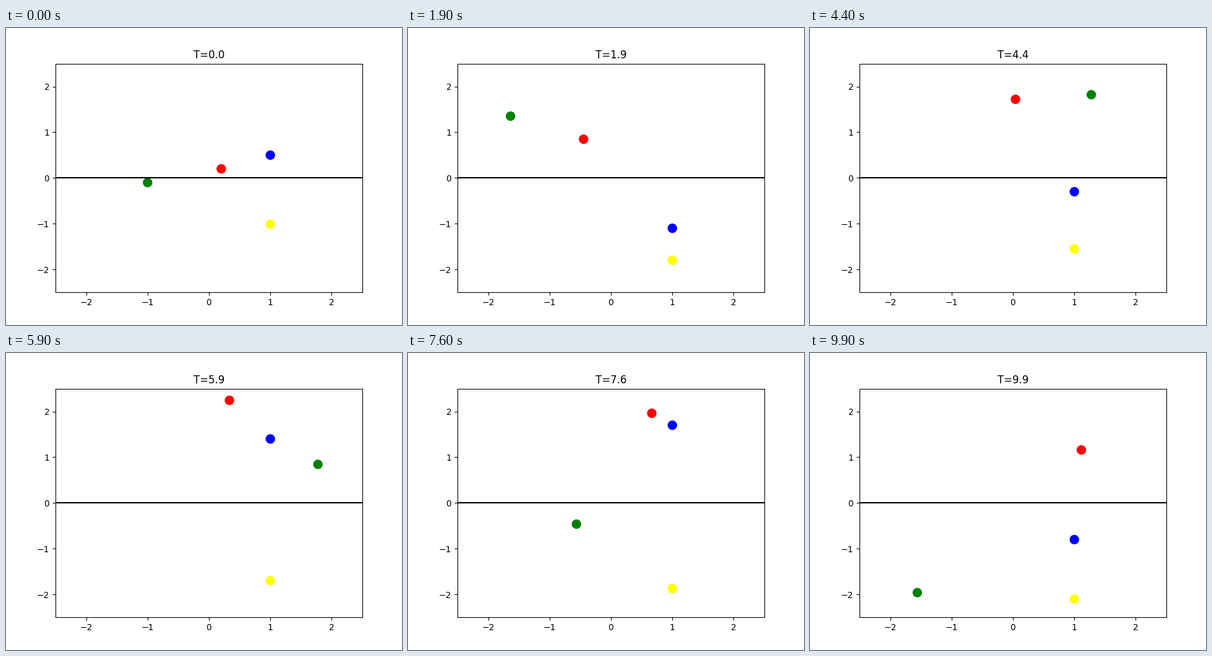
Recreate the animation shown at these times as a matplotlib script. Size 640x480 px, loop 10000 ms.

```python
import itertools

import matplotlib.pyplot as plt
import numpy as np
from matplotlib.animation import FuncAnimation

STEP = 0.1      # seconds per frame
FRAMES = 100
RADIUS = 0.1
LIMIT = 2.5 - RADIUS
LEAD = 0.997    # seconds a leading ball runs ahead until its first hit
EPS = 1e-6


class Ball:
    def __init__(self, color, pos, vel, leads=False):
        self.color = color
        self.pos = np.array(pos, float)
        self.vel = np.array(vel, float)
        self.history = []
        self.record(0)
        if leads:
            self.pos += self.vel * LEAD

    def record(self, t):
        self.history.append((t, self.pos.copy(), self.vel.copy()))

    def at(self, now):
        # A change shows one step late, so balls briefly overshoot.
        past = [leg for leg in self.history if leg[0] <= now - STEP + EPS]
        t, pos, vel = past[-1] if past else self.history[0]
        return pos + vel * (now - t)


def wall_delay(ball, axis):
    v = ball.vel[axis]
    return (np.sign(v) * LIMIT - ball.pos[axis]) / v if v else np.inf


def line_delay(ball):
    y, vy = ball.pos[1], ball.vel[1]
    if y * vy < 0 and abs(y) >= RADIUS - EPS:
        return (abs(y) - RADIUS) / abs(vy)
    return np.inf


def hit_delay(a, b):
    gap, vel = b.pos - a.pos, b.vel - a.vel
    closing = gap @ vel
    root = closing**2 - vel @ vel * (gap @ gap - 4 * RADIUS**2)
    if closing >= 0 or root < 0:
        return np.inf
    return (-closing - root**0.5) / (vel @ vel)


def bounce(ball, axis):
    ball.vel[axis] *= -1


def cross(ball):
    """Slip through the middle line in no time."""
    ball.pos += ball.vel * 2 * RADIUS / abs(ball.vel[1])


def collide(a, b):
    """Elastic hit of equal masses."""
    normal = (b.pos - a.pos) / (2 * RADIUS)
    push = (b.vel - a.vel) @ normal * normal
    a.vel += push
    b.vel -= push


def simulate(balls, end):
    t = 0
    while True:
        events = []
        for ball in balls:
            events += [(wall_delay(ball, k), bounce, (ball, k)) for k in (0, 1)]
            events.append((line_delay(ball), cross, (ball,)))
        events += [(hit_delay(*pair), collide, pair)
                   for pair in itertools.combinations(balls, 2)]
        delay, action, args = min(events, key=lambda e: e[0])
        t += delay
        if t > end:
            return
        for ball in balls:
            ball.pos += ball.vel * delay
        action(*args)
        for ball in args:
            if isinstance(ball, Ball):
                ball.record(t)


balls = [
    Ball("red", (0.2, 0.2), (-0.97, 0), leads=True),
    Ball("blue", (1, 0.5), (0, -1)),
    Ball("green", (-1, -0.1), (0, 1)),
    Ball("yellow", (1, -1.01), (0, -0.1), leads=True),
]
simulate(balls, FRAMES * STEP)

fig, ax = plt.subplots(figsize=(6.4, 4.8), dpi=100)
ax.set_xlim(-2.5, 2.5)
ax.set_ylim(-2.5, 2.5)
ax.axhline(0, color="black", lw=1.5)
title = ax.set_title("T=0.0")
dots = ax.scatter(*np.transpose([ball.at(0) for ball in balls]), s=100,
                  c=[ball.color for ball in balls])


def update(frame):
    now = frame * STEP
    dots.set_offsets([ball.at(now) for ball in balls])
    title.set_text(f"T={now:.1f}")
    return dots, title


anim = FuncAnimation(fig, update, frames=FRAMES, interval=100,
                     repeat=True, repeat_delay=0, blit=False)
plt.show()
```
